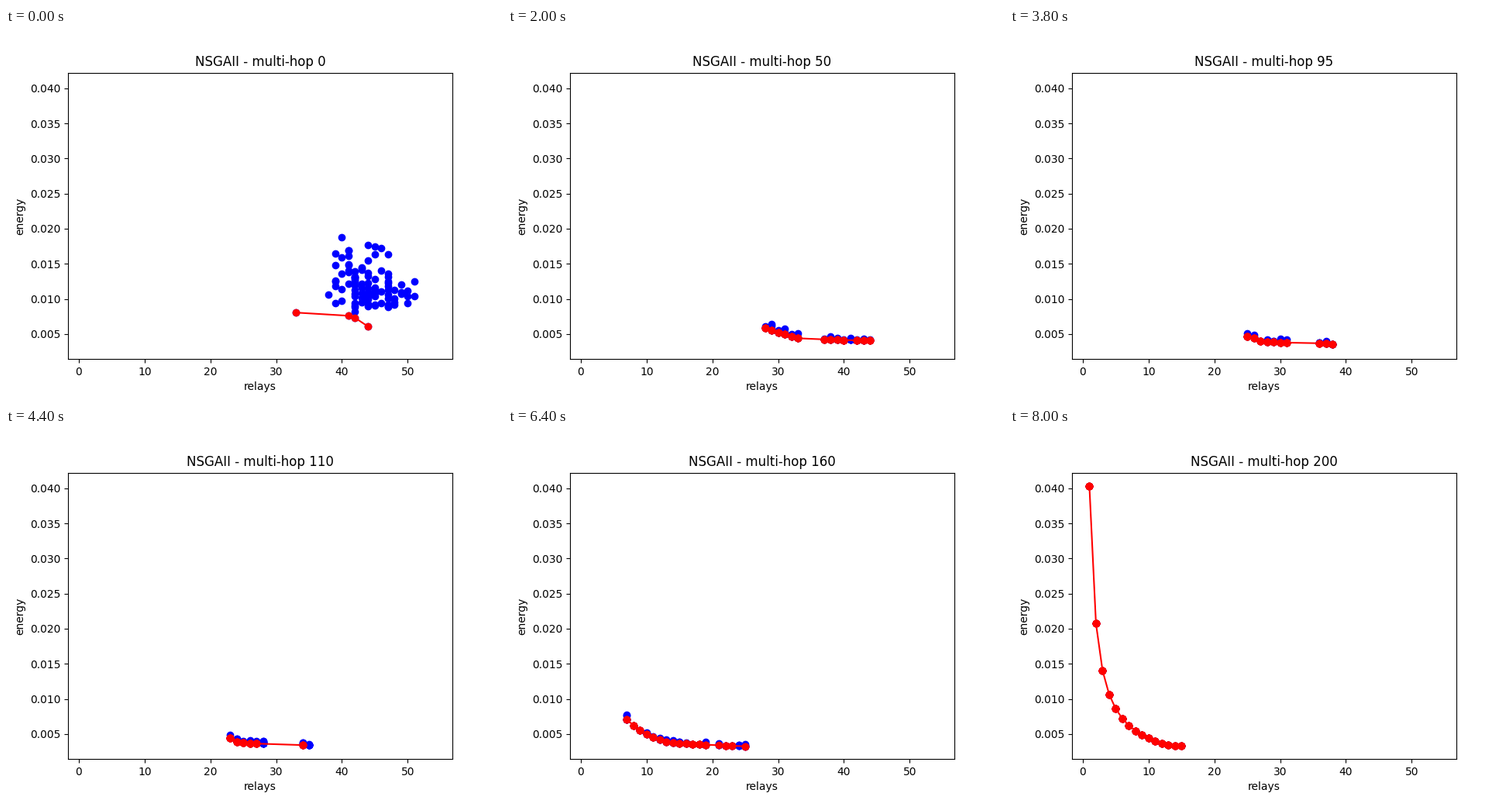
These frames come from a looping animation (640 px wide and 480 px high, 8200 ms). A matplotlib script:

```python
import numpy as np
import matplotlib.pyplot as plt
from matplotlib.animation import FuncAnimation

FRAMES, INTERVAL, GEN_STEP = 41, 200, 5
LAST_GEN = (FRAMES - 1) * GEN_STEP
SIZE = 100        # individuals per generation
SETTLE = 25       # generations until the first cloud has converged
UNIT = 1e-4       # energies below are in this unit

# generation, fewest and most relays, empty gap (exclusive),
# load (relays * energy) at the left end, knee width, energy at the right end
KEYS = np.array([
    (25, 32, 51, 41, 49, 1760, 12, 46.0),
    (50, 28, 44, 33, 37, 1638, 14, 40.5),
    (75, 27, 41, 35, 37, 1363, 16, 38.3),
    (110, 23, 35, 28, 34, 1012, 8, 34.0),
    (150, 13, 28, 21, 25, 702, 13, 33.5),
    (160, 7, 25, 19, 21, 494, 7, 32.5),
    (180, 1, 18, 18, 18, 403, 1, 32.8),
    (200, 1, 15, 15, 15, 403, 1, 32.8),
]).T
ELITE = np.array([(33, 80.5), (41, 76), (42, 73), (44, 60.5)])


def first_cloud():
    """Random first generation, led by a few good individuals."""
    rng = np.random.default_rng(4)
    n = SIZE - len(ELITE)
    x = np.clip(np.rint(rng.normal(44.3, 3, n)), 38, 51)
    e = 81 + rng.gamma(2, 17, n)
    return np.r_[ELITE[:, 0], x], np.r_[ELITE[:, 1], e]


def converged(gen):
    """Individuals on, or slightly above, the trade-off curve."""
    lo, hi, gap_lo, gap_hi, load, knee, base = (
        np.interp(gen, KEYS[0], row) for row in KEYS[1:])
    lo, hi = round(lo), round(hi)
    columns = np.arange(lo, hi + 1)
    columns = columns[(columns <= gap_lo) | (columns >= gap_hi)]
    slot = np.arange(SIZE) % len(columns)
    x = columns[slot].astype(float)
    steep = load / lo * (1 + (x - lo) / knee) ** -0.96
    e = np.maximum(steep, base * (hi / x) ** 0.25)

    rng = np.random.default_rng(gen)
    lag = 0.3 * np.maximum(rng.random(len(columns)) - 0.55, 0)
    lag[0] = 0
    spread = 0.2 * (1 - (gen / LAST_GEN) ** 4)
    return x, e * (1 + spread * (lag[slot] + rng.random(SIZE) ** 12))


def population(gen):
    x0, e0 = first_cloud()
    x1, e1 = converged(gen)
    u = min(gen / SETTLE, 1)
    x = np.rint(x0 + (x1 - x0) * u)
    e = np.round(e0 + (e1 - e0) * u ** 0.5, 1)
    return x, e


def pareto(x, e):
    """Non-dominated individuals from left to right, equal ones included."""
    front = []
    for p in sorted(zip(x, e)):
        if not front or p[1] < front[-1][1] or p == front[-1]:
            front.append(p)
    return np.array(front).T


fig, ax = plt.subplots(figsize=(6.4, 4.8), dpi=100)
ax.set(xlim=(-1.645, 56.8), ylim=(0.001425, 0.042235),
       xlabel="relays", ylabel="energy")
crowd_dots, = ax.plot([], [], "o", color="blue")
front_line, = ax.plot([], [], "o-", color="red")
title = ax.set_title("")


def update(i):
    gen = i * GEN_STEP
    x, e = population(gen)
    front_x, front_e = pareto(x, e)
    crowd_dots.set_data(x, e * UNIT)
    front_line.set_data(front_x, front_e * UNIT)
    title.set_text(f"NSGAII - multi-hop {gen}")
    return crowd_dots, front_line, title


anim = FuncAnimation(fig, update, frames=FRAMES, interval=INTERVAL,
                     repeat=True, repeat_delay=0)
plt.show()
```
